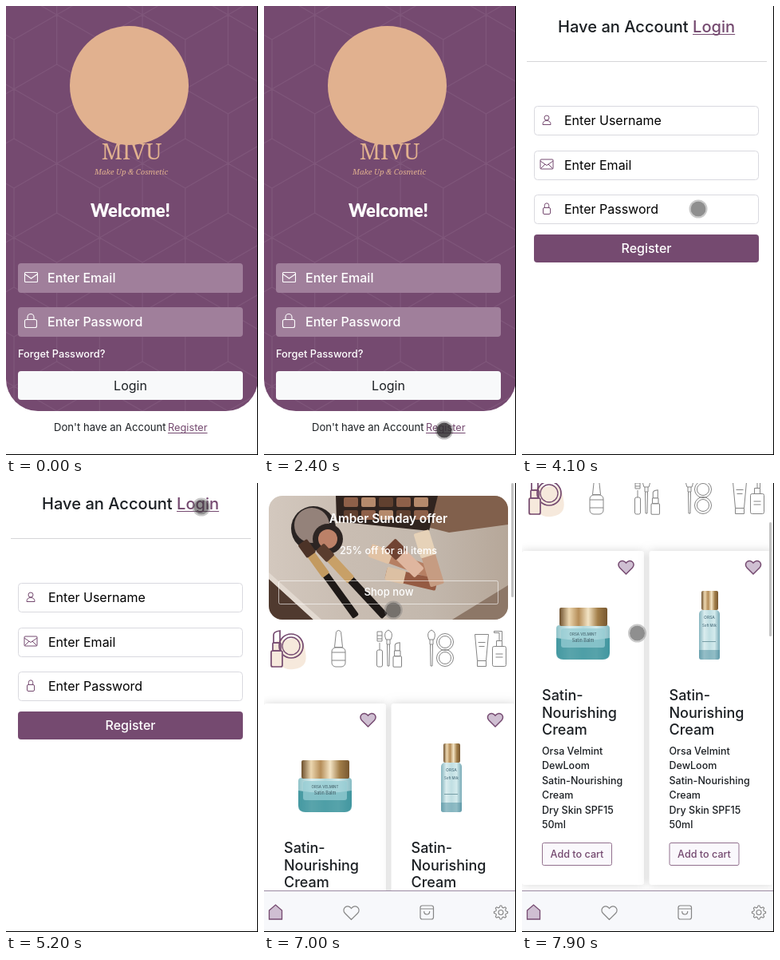
Animation, 316 px wide and 562 px high, one loop 8 s. Source, as an HTML page with a canvas:

```html
<!DOCTYPE html>
<html lang="en">
<head>
<meta charset="utf-8">
<title>Beauty store app</title>
<style>
html, body { margin: 0; width: 100%; height: 100%; overflow: hidden; background: #fff; }
canvas { display: block; width: 316px; height: 562px; }
</style>
</head>
<body>
<canvas id="stage"></canvas>
<script>
const W = 316, H = 562, LOOP = 8000, STEP = 100;
const PLUM = '#754a70', LILAC = '#cfbfd2', INK = '#1b1f23', GREY = '#858585', PEACH = '#e1b18f';
const SANS = 'Inter, Roboto, sans-serif', SERIF = '"Noto Serif", "Liberation Serif", serif';
const canvas = document.getElementById('stage');
const ratio = window.devicePixelRatio || 1;
canvas.width = W * ratio;
canvas.height = H * ratio;
const c = canvas.getContext('2d');

function text(str, x, y, size, color, weight = 400, align = 'left', family = SANS) {
  c.font = `${weight} ${size}px ${family}`;
  c.textAlign = align;
  c.fillStyle = color;
  c.fillText(str, x, y);
  return c.measureText(str).width;
}

function paint(fill, stroke, width = 1) {
  if (fill) { c.fillStyle = fill; c.fill(); }
  if (stroke) { c.strokeStyle = stroke; c.lineWidth = width; c.stroke(); }
}

function box(x, y, w, h, r, fill, stroke, width) {
  c.beginPath();
  c.roundRect(x, y, w, h, r);
  paint(fill, stroke, width);
}

function disc(x, y, r, fill, stroke, width) {
  c.beginPath();
  c.arc(x, y, r, 0, 7);
  paint(fill, stroke, width);
}

function path(d, x, y, fill, stroke, width = 1) {
  const p = new Path2D(d);
  c.save();
  c.translate(x, y);
  if (fill) { c.fillStyle = fill; c.fill(p); }
  if (stroke) { c.strokeStyle = stroke; c.lineWidth = width; c.stroke(p); }
  c.restore();
}

function link(str, x, y, size, weight) {
  const w = text(str, x, y, size, PLUM, weight);
  c.fillRect(x, y + 2, w, 1);
}

// Value at time t along [time, ...values] stops
function along(stops, t) {
  let i = 1;
  while (i < stops.length - 1 && t > stops[i][0]) i++;
  const a = stops[i - 1], b = stops[i];
  const k = Math.min(1, Math.max(0, (t - a[0]) / (b[0] - a[0])));
  return a.slice(1).map((v, n) => v + (b[n + 1] - v) * k);
}

const HEART = 'M0 8.5 L-8 0.5 C-13 -5 -5 -12 0 -5.5 C5 -12 13 -5 8 0.5 Z';
const MAIL = 'M-7 -6 H7 Q8 -6 8 -5 V5 Q8 6 7 6 H-7 Q-8 6 -8 5 V-5 Q-8 -6 -7 -6 Z M-8 -4 L0 1.5 L8 -4';
const ARROW = 'M0 0 V16 L4 12.5 L7 19 L9.5 18 L6.7 11.5 H11.5 Z';

/* Login */
function cubes() {
  const side = 62, dx = side * Math.sqrt(3), dy = side * 1.5;
  c.beginPath();
  for (let row = -1; row < 7; row++) {
    for (let col = -1; col < 4; col++) {
      const x = 10 + (col + (row & 1) / 2) * dx, y = 42 + row * dy;
      for (let k = 0; k < 6; k++) {
        const a = k * Math.PI / 3 + Math.PI / 6, b = a + Math.PI / 3;
        const px = x + side * Math.cos(a), py = y + side * Math.sin(a);
        if (k < 3) {
          c.moveTo(px, py);
          c.lineTo(x + side * Math.cos(b), y + side * Math.sin(b));
        }
        if (k % 2) {
          c.moveTo(x, y);
          c.lineTo(px, py);
        }
      }
    }
  }
  paint(null, 'rgba(255,235,250,.07)', 1.3);
}

function loginPage() {
  c.save();
  box(0, -50, 316, 557, 40, PLUM);
  c.clip();
  cubes();
  c.restore();
  disc(154.5, 99.5, 74.5, PEACH);
  text('MIVU', 157.5, 192, 28, PEACH, 500, 'center', SERIF);
  text('Make Up & Cosmetic', 157, 211, 9.6, PEACH, 'italic 400', 'center', SERIF);
  text('Welcome!', 156, 264, 22, '#fff', 900, 'center', 'Lato, sans-serif');

  const field = '#a07f9b';
  box(15, 322, 282, 37, 4, field);
  box(15, 377, 282, 37, 4, field);
  path(MAIL, 31.5, 339.5, null, '#fff', 1.1);
  box(23.5, 392.5, 15, 10, 2, null, '#fff', 1.1);
  path('M-4 0 V-3 A4 4 0 0 1 4 -3 V0', 31, 392.5, null, '#fff', 1.1);
  text('Enter Email', 52, 346, 16, '#fff', 500);
  text('Enter Password', 52, 401, 16, '#fff', 500);
  text('Forget Password?', 15, 440, 12.8, '#fff', 500);
  box(15, 457, 282, 36, 4, '#f8f9fa');
  text('Login', 156, 481, 16, INK, 400, 'center');
  text("Don't have an Account", 60, 532, 13.1, INK);
  link('Register', 203, 532, 12.8, 400);
}

/* Register */
function registerPage(t) {
  const ready = Math.min(1, Math.max(0, (t - 3000) / 300));
  const w = text('Have an Account ', 45, 33, 20.1, INK, 500);
  link('Login', 45 + w, 33, 20.1, 500);
  c.fillStyle = '#d6d6d8';
  c.fillRect(6, 69, 301, 1);
  ['Username', 'Email', 'Password'].forEach((name, i) => {
    const y = 125.5 + i * 55.5;
    box(15.5, Math.floor(y) + .5, 281, 36, 4, '#fff', ready < 1 ? '#c9c9cb' : '#d9d9df');
    text('Enter ' + name, 53, [149, 205, 260][i], 16, '#000');
  });
  c.globalAlpha = ready;
  disc(31, 140, 3, null, PLUM);
  path('M-5 5 Q-5 0 0 0 Q5 0 5 5 Z', 31, 143.5, null, PLUM);
  path(MAIL, 31, 198, null, PLUM);
  path('M-7.5 5.5 L-2 0 M7.5 5.5 L2 0', 31, 198, null, PLUM);
  box(26.5, 252.5, 9, 8, 1.5, null, PLUM);
  path('M-2.7 0 V-3 A2.7 2.7 0 0 1 2.7 -3 V0', 31, 252.5, null, PLUM);
  c.globalAlpha = .75 + .25 * ready;
  box(15, 286, 282, 35, 4, PLUM);
  c.globalAlpha = 1;
  text('Register', 156, 309, 16, ready < 1 ? '#c2bcc2' : '#fff', 500, 'center');
}

/* Home */
function stick(x, y, len, w, deg, fill, tip, tipLen) {
  c.save();
  c.translate(x, y);
  c.rotate(deg * Math.PI / 180);
  box(0, -w / 2, len, w, 2, fill);
  if (tip) box(0, -w / 2 - 1, tipLen, w + 2, 2, tip);
  c.restore();
}

function across(x, w, stops) {
  const g = c.createLinearGradient(x, 0, x + w, 0);
  stops.forEach((s, i) => g.addColorStop(i / (stops.length - 1), s));
  return g;
}

function banner() {
  c.save();
  box(6, 16, 300, 155, 17);
  c.clip();
  c.fillStyle = across(6, 300, ['#d3c8be', '#c9bdb2', '#c3b8ad', '#b6a799']);
  c.fillRect(6, 16, 300, 155);
  path('M6 120 L62 171 H6 Z', 0, 0, '#503a2f');
  path('M6 112 L72 171 H62 L6 120 Z', 0, 0, '#e2d9d0');
  path('M306 128 V171 H236 Z', 0, 0, '#8d7767');
  path('M212 16 H306 V52 L232 62 L208 56 Z', 0, 0, '#81604c');
  path('M90 16 H218 L207 60 L91 48 Z', 0, 0, '#30241f');
  for (let i = 0; i < 10; i++)
    box(100 + i % 5 * 22, 18 + (i > 4 ? 16 : 0), 18, 12, 2, ['#8e6049', '#b58a6c', '#60402f'][i % 3]);
  disc(62, 57, 28, '#2a2423');
  disc(60, 53, 22, '#94827a');
  disc(80, 70, 19, '#2d2523');
  disc(80, 70, 12, '#bc8168');
  stick(52, 80, 108, 9, 54, '#1e1917', '#c39a60', 44);
  stick(75, 85, 112, 10, 47, '#1e1917', '#c8a067', 50);
  stick(48, 74, 20, 14, 54, '#4c3327');
  stick(70, 80, 20, 14, 47, '#5a3d2e');
  stick(133, 84, 88, 15, 20, '#b67f63', '#e1c2a4', 28);
  stick(153, 113, 65, 15, 13, '#955b43', '#dcc0a3', 24);
  stick(158, 76, 52, 17, 45, '#dfb69f', '#704332', 20);
  stick(197, 61, 70, 18, 73, '#c69c82', '#e6d2b8', 32);
  c.restore();
  text('Amber Sunday offer', 156, 50, 15.3, '#fff', 600, 'center');
  text('25% off for all items', 156, 89, 12.7, '#fff', 500, 'center');
  box(18.5, 122.5, 275, 29, 2, null, 'rgba(255,255,255,.6)');
  text('Shop now', 156.5, 141, 13, '#fff', 500, 'center');
}

function lipstick(x, y, color, width) {
  box(x, y + 26, 14, 20, 2, null, color, width);
  box(x + 2, y + 16, 10, 10, 1, null, color, width);
  path('M0 15 V5 Q0 1 8 0 V15 Z', x + 3, y + 1, null, color, width);
}

function brush(x, y) {
  path('M-3 12 Q-7 3 0 0 Q7 3 3 12 Z M-2 12 V18 H2 V12 M-1.5 18 L-1 45 H1 L1.5 18', x, y, null, GREY);
}

function categories() {
  path('M4 27 Q5 9 24 12 Q44 4 46 28 Q50 47 31 49 Q14 52 4 27 Z', 6, 184, '#f6e9dc');
  disc(34, 204, 15, null, PLUM, 1.7);
  disc(34, 204, 11, null, PLUM, 1.3);
  box(8, 209, 16, 22, 1, '#f6e9dc');
  lipstick(9, 184, PLUM, 1.7);

  path('M0 21 L2 2 Q5 -2 8 2 L10 21 Z', 88.5, 184.5, null, GREY);
  box(85, 206, 17, 24, 5, null, GREY);
  path('M0 0 H17 M0 10 H17', 85, 212, null, GREY);

  box(141.5, 209, 7, 21, 2, null, GREY);
  path('M0 9 V0 M-3 -2 V-14 H3 V-2 Z M-3 -5 H3 M-3 -9 H3', 145, 200, null, GREY);
  brush(156, 184);
  c.save();
  c.translate(162, 199);
  c.scale(.75, .68);
  lipstick(0, 0, GREY, 1.4);
  c.restore();

  brush(210, 184);
  for (const y of [199, 219]) {
    disc(227, y, 10.5, null, GREY);
    disc(227, y, 7.5, null, GREY);
  }

  path('M0 0 H17 L14 33 H3 Z M3 33 V40 H14 V33 M4 10 H13 M5 15 H12', 264.5, 189.5, null, GREY);
  box(286.5, 204.5, 17, 25, 2, null, GREY);
  path('M5 19 V12 H12 V19 M8.5 12 V2 H2 V0 H12 V12', 286.5, 185.5, null, GREY);
  path('M4 0 H13 M4 4 H13', 286.5, 214, null, GREY);
}

const GOLD = ['#6d4f2c', '#ecd7b0', '#b58d58', '#f3e4c5', '#a27e49', '#775730'];

function jar() {
  box(43, 369, 67, 43, [4, 4, 9, 9], across(43, 67, ['#8fc3c9', '#dceff0', '#b4dadd', '#d3eaec', '#86bcc4']));
  path('M0 -14 Q33 -8 67 -14 V5 Q67 13 58 13 H9 Q0 13 0 5 Z', 43, 399, 'rgba(40,136,146,.72)');
  box(49, 373, 55, 24, 3, 'rgba(150,205,211,.75)');
  box(47, 347, 60, 23, 2, across(47, 60, GOLD));
  text('ORSA VELMINT', 76.5, 382, 4.5, '#48666f', 500, 'center');
  text('Satin Balm', 76.5, 390, 5.5, '#48666f', 500, 'center');
}

function bottle() {
  box(225, 326, 21, 24, 2, across(225, 21, GOLD));
  box(222, 350, 26, 62, [5, 5, 3, 3], across(222, 26, ['#86b5bf', '#d9ecee', '#c0dee2', '#d3eaec', '#78aab6']));
  box(222, 400, 26, 12, [0, 0, 3, 3], 'rgba(64,134,150,.45)');
  text('ORSA', 235, 361, 5, '#4e7380', 500, 'center');
  text('Soft Milk', 235, 371, 4.3, '#4e7380', 500, 'center');
  c.fillStyle = '#769da5';
  c.fillRect(226, 389, 17, 1);
}

const TITLE = ['Satin-', 'Nourishing', 'Cream'];
const DETAIL = ['Orsa Velmint', 'DewLoom', 'Satin-Nourishing', 'Cream', 'Dry Skin SPF15', '50ml'];

function card(x, w, product) {
  c.save();
  c.shadowColor = 'rgba(0,0,0,.16)';
  c.shadowBlur = 12 * ratio;
  box(x, 276, w, 418, 3, '#fff');
  c.restore();
  const left = x + 25;
  path(HEART, x + 130.5, 296.5, LILAC, PLUM, 1.5);
  product();
  TITLE.forEach((s, i) => text(s, left, 463 + i * 21.5, 18, INK, 500));
  DETAIL.forEach((s, i) => text(s, left, 531 + i * 18.4, 12.5, INK, 450));
  box(left + .5, 641.5, 87, 28, 2, '#faf8fc', '#92708e');
  text('Add to cart', left + 44, 659.5, 12.6, PLUM, 500, 'center');
}

function gear(x, y) {
  c.beginPath();
  for (let i = 0; i < 32; i++) {
    const r = i % 4 < 2 ? 8.6 : 6.4, a = (i - .5) * Math.PI / 16;
    c.lineTo(x + r * Math.cos(a), y + r * Math.sin(a));
  }
  c.closePath();
  paint(null, GREY, 1.1);
  disc(x, y, 3, null, GREY, 1.1);
}

function navBar() {
  c.fillStyle = '#f7f8fb';
  c.fillRect(0, 510, W, 52);
  c.fillStyle = '#9c8aa2';
  c.fillRect(0, 510, W, 1);
  path('M-8 -2 L0 -9 L8 -2 V9 H-8 Z', 14.5, 537, LILAC, PLUM, 1.3);
  path(HEART, 109.5, 538, null, GREY, 1.2);
  box(196, 529, 16.5, 17, 2.5, null, GREY, 1.2);
  path('M-8 -4 H8 M-3.5 -1 Q-3.5 3 0 3 Q3.5 3 3.5 -1', 204.2, 537, null, GREY, 1.2);
  gear(297, 537.5);
}

function homePage(t) {
  const [scroll] = along([[7300, 0], [7500, 60], [7900, 191]], t);
  c.save();
  c.translate(0, -scroll);
  banner();
  categories();
  card(0, 153, jar);
  card(159.5, 155, bottle);
  c.restore();
  navBar();
  box(310, scroll * .256, 3, 143, 1.5, '#c3c3c3');
}

/* Pointer */
const TO_REGISTER = [[700, -10, 330], [1000, 37, 385], [1300, 142, 428], [1800, 226, 531], [2700, 226, 531]];
const TO_LOGIN = [[3600, 226, 531], [4000, 215, 310], [4500, 245, 30], [5400, 245, 30]];
const TO_SCROLL = [[6400, 245, 33], [6800, 180, 130], [7200, 144.5, 188]];

function touch(stops, t, dark) {
  const [x, y] = along(stops, t);
  disc(x, y, 9.5, dark ? 'rgba(48,46,48,.85)' : 'rgba(55,55,55,.56)');
  disc(x, y, 10.5, null, dark ? 'rgba(40,35,40,.3)' : 'rgba(120,120,120,.4)', 2);
}

function pointer(t) {
  if (t < 700) return;
  if (t < 2700) touch(TO_REGISTER, t, true);
  else if (t < 3700) path(ARROW, 226.5, 531.5, '#fff', '#000');
  else if (t < 5400) touch(TO_LOGIN, t);
  else if (t >= 6400) touch(TO_SCROLL, t);
}

function draw(t) {
  c.setTransform(ratio, 0, 0, ratio, 0, 0);
  c.fillStyle = '#fff';
  c.fillRect(0, 0, W, H);
  if (t < 2900) loginPage();
  else if (t < 5400) registerPage(t);
  else if (t >= 5700) homePage(t);
  pointer(t);
  c.fillStyle = '#000';
  c.fillRect(315, 0, 1, H);
  c.fillRect(0, 561, W, 1);
}

const start = performance.now();
function tick() {
  const t = (performance.now() - start) % LOOP;
  draw(Math.floor(t / STEP) * STEP);
  requestAnimationFrame(tick);
}
tick();
</script>
</body>
</html>
```
